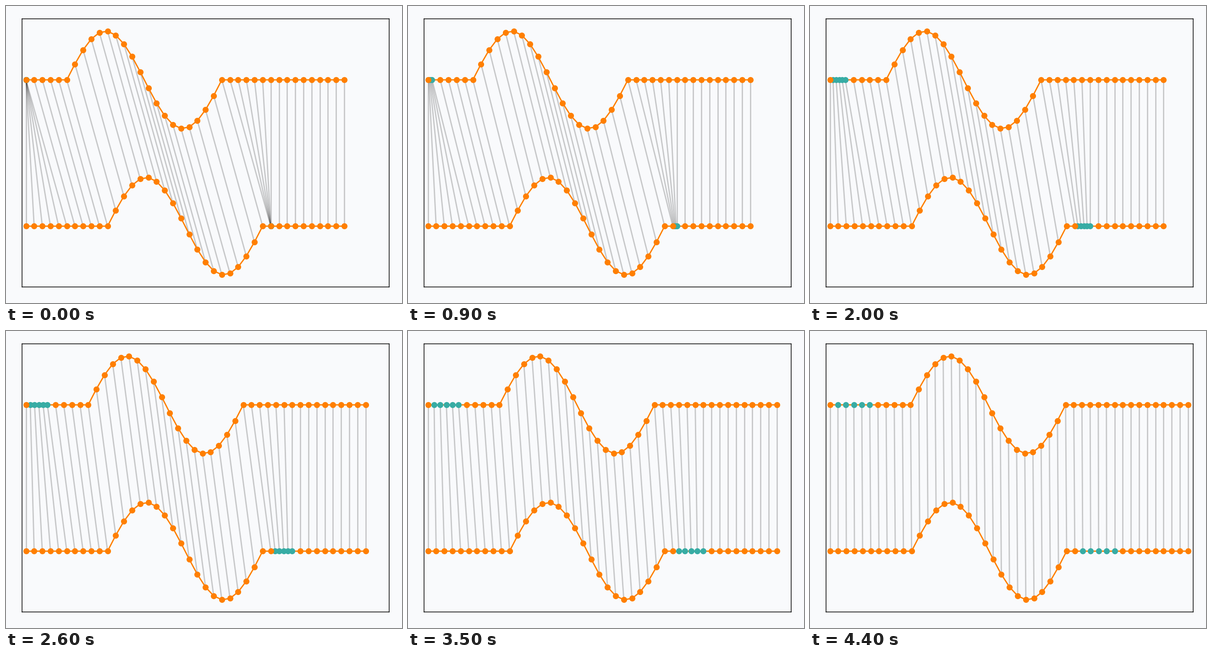
Animation of 864x648 px, one loop 5000 ms. Source, as a matplotlib script:

```python
import numpy as np
import matplotlib.pyplot as plt
from matplotlib.animation import FuncAnimation

W, H, DPI = 864, 648, 135
FRAMES, INTERVAL = 50, 100
HOLD, STEPS, LAST = 5, 40, 39
N, LAG, TURN = 45, 5, 30   # matched pairs, lag between waves, index where the lower wave waits
BG, ORANGE, TEAL = "#f9fafc", "#ff7f00", "#37aca4"


def wave(start):
    y = np.zeros(N - LAG)
    y[start:start + 20] = np.sin(np.linspace(0, 2 * np.pi, 20))
    return y


def stretch(k, start, f):
    """Pair positions when the repeats after `start` open up by fraction f."""
    return np.minimum(k, start) + f * np.clip(k - start, 0, LAG) + np.maximum(k - start - LAG, 0)


k = np.arange(N)
starts = (0, TURN)
ys = [(wave(p) - off)[stretch(k, s, 0).astype(int)]
      for p, off, s in ((5, 0, 0), (10, 3, TURN))]
repeats = [(k > s) & (k <= s + LAG) for s in starts]

fig = plt.figure(figsize=(W / DPI, H / DPI), dpi=DPI, facecolor=BG)
left, right, top, bottom = 34.69, 835.875, 28.125, 613.31
ax = fig.add_axes([left / W, 1 - bottom / H, (right - left) / W, (bottom - top) / H],
                  facecolor=BG)
ax.set(xlim=(-0.5, 44.5), ylim=(-4.25, 1.25), xticks=[], yticks=[])

links = [ax.plot([], [], color="black", alpha=0.2, lw=1.5, zorder=1)[0] for _ in k]
curves = [ax.plot([], [], color=ORANGE, lw=1.5, zorder=2)[0] for _ in starts]
copies = [ax.plot([], [], "o", color=TEAL, ms=6, zorder=3)[0] for _ in starts]
points = [ax.plot([], [], "o", color=ORANGE, ms=6, zorder=4)[0] for _ in starts]


def update(i):
    f = np.clip(i - HOLD, 0, LAST) / STEPS
    xs = [stretch(k, s, f) for s in starts]
    for x, y, rep, curve, copy, point in zip(xs, ys, repeats, curves, copies, points):
        curve.set_data(x, y)
        copy.set_data(x[rep], y[rep])
        point.set_data(x[~rep], y[~rep])
    for j, link in enumerate(links):
        link.set_data([x[j] for x in xs], [y[j] for y in ys])
    return links + curves + copies + points


anim = FuncAnimation(fig, update, frames=FRAMES, interval=INTERVAL,
                     repeat=True, repeat_delay=0, blit=False)
plt.show()
```
